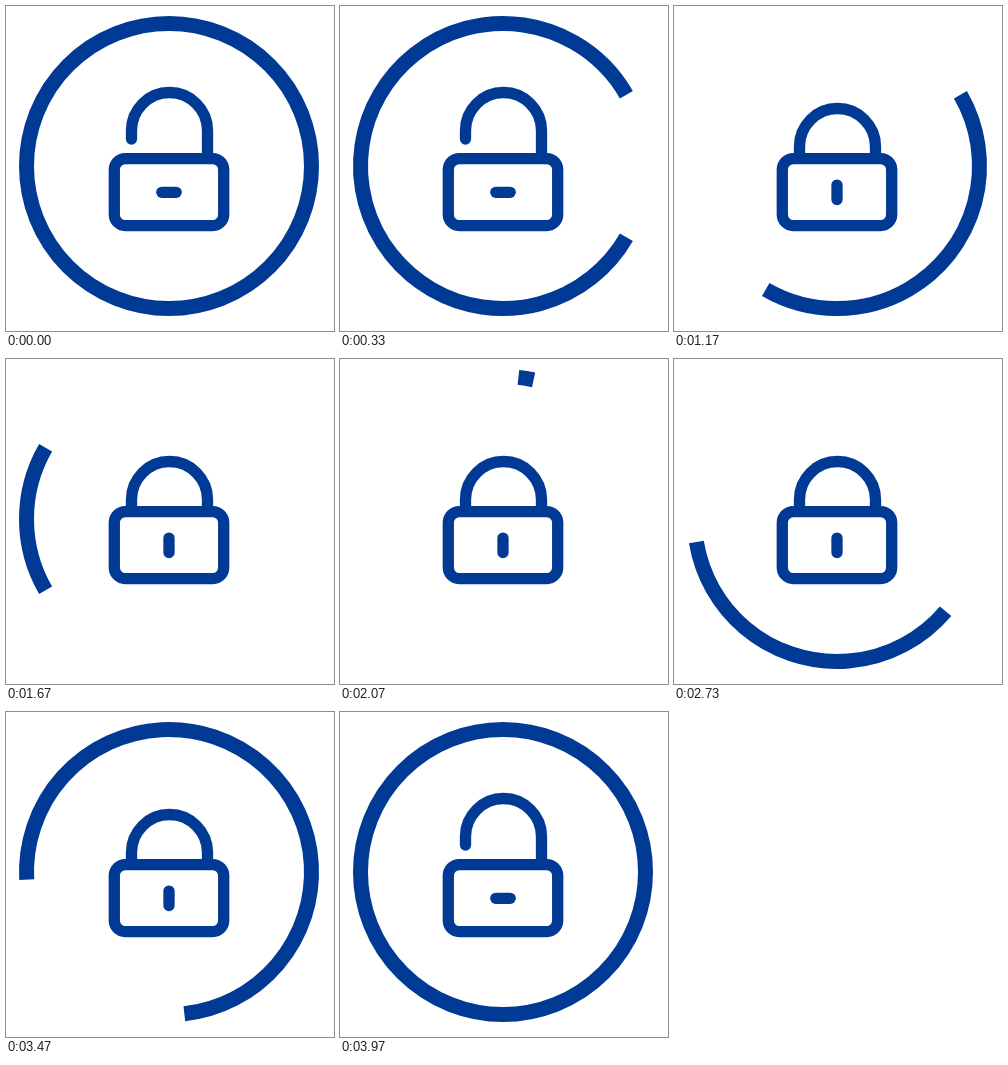
Write an HTML page that moves like this. It is 328x325 px and loops after 4.01 s.

```html
<!DOCTYPE html>
<html lang="en">
<head>
<meta charset="utf-8">
<title>Lock loader</title>
<style>
  html, body { margin: 0; width: 100%; height: 100%; overflow: hidden; background: #fff; }
  svg { display: block; fill: none; stroke: #003a94; stroke-width: 11.3; stroke-linecap: round; }
  #ring { stroke-width: 15; stroke-linecap: butt; }
</style>
</head>
<body>
<svg width="328" height="325" viewBox="0 0 328 325">
  <circle id="ring" cx="163" cy="160" r="142.5" pathLength="360"/>
  <path id="shackle"/>
  <rect x="108.3" y="152.6" width="109.4" height="67" rx="11"/>
  <path id="keyhole" d="M155.8 186.3h14.4"/>
</svg>
<script>
const LOOP = 4010, FPS = 30, LAST = 119;
const [ring, shackle, keyhole] = ['ring', 'shackle', 'keyhole'].map(id => document.getElementById(id));

// Progress from 0 to 1 between two steps
const ramp = (n, from, to) => Math.min(1, Math.max(0, (n - from) / (to - from)));

function draw(time) {
  const n = Math.min(LAST, Math.floor((time % LOOP + 5) * FPS / 1000));

  // The tail runs two turns while the ring shrinks, then the head does while it grows
  const shrink = ramp(n, 0, 60), grow = ramp(n, 61, LAST);
  const start = 720 * shrink + 360 * grow;
  const length = 360 * (1 - shrink + grow);
  ring.setAttribute('transform', `rotate(${start - 90} 163 160)`);
  ring.setAttribute('stroke-dasharray', `${length} 360`);
  ring.setAttribute('visibility', length > 0.01 ? 'visible' : 'hidden');

  const open = ramp(n, 105, LAST);
  const y = 124.5 + 16 * (ramp(n, 12, 26) - open);
  shackle.setAttribute('d', `M125.5 ${y + 8.5}V${y}a38 38 0 0 1 76 0V152`);
  keyhole.setAttribute('transform', `rotate(${90 * (ramp(n, 14, 29) - open)} 163 186.3)`);
}

const began = performance.now();
function tick() {
  draw(performance.now() - began);
  requestAnimationFrame(tick);
}
tick();
</script>
</body>
</html>
```
